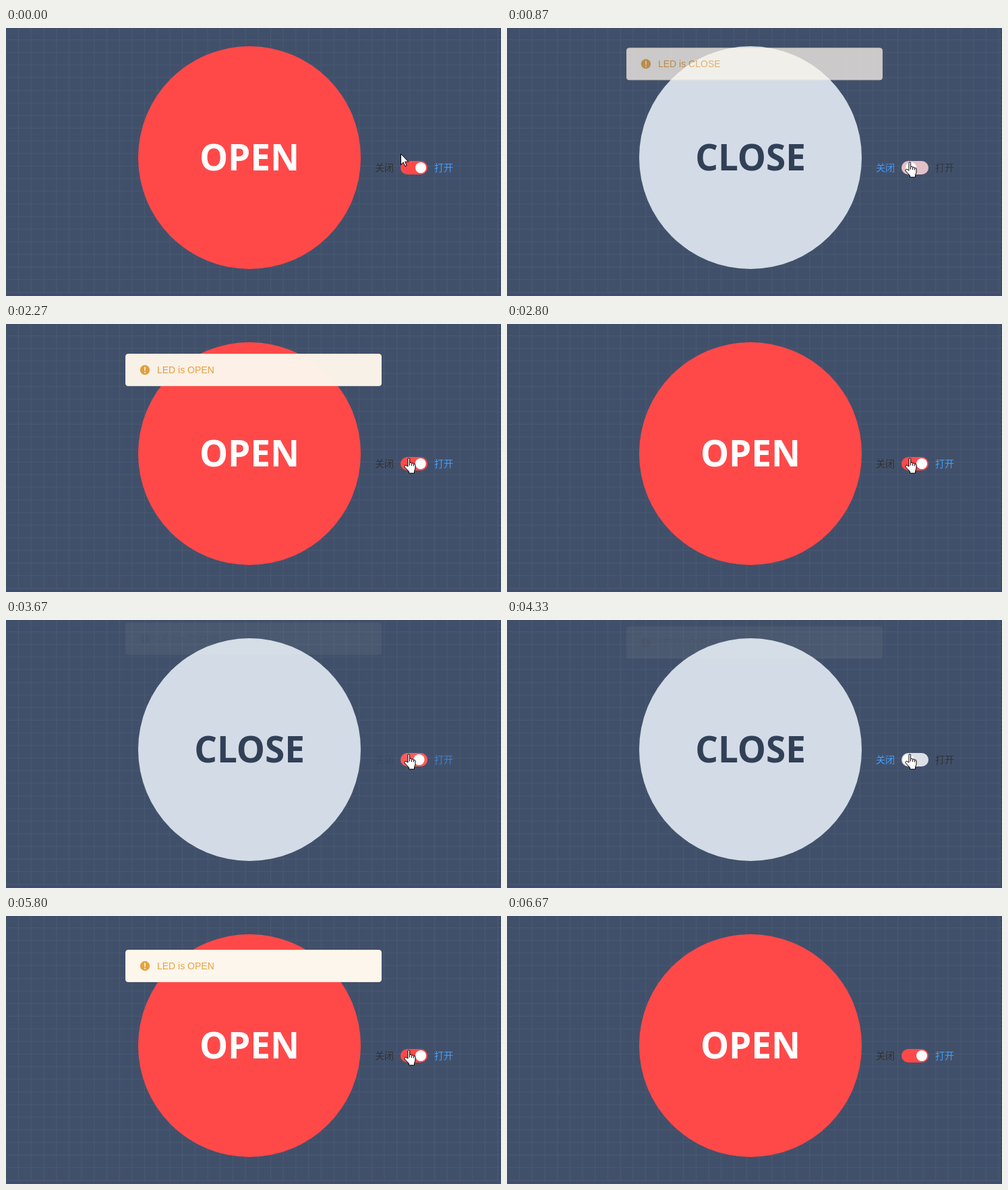
Animation, 734 px wide and 397 px high, one loop 7540 ms. Source, as an HTML page:

```html
<!DOCTYPE html>
<html lang="zh-CN">
<head>
<meta charset="utf-8">
<title>LED switch</title>
<style>
  html, body { margin: 0; width: 100%; height: 100%; overflow: hidden; background: #41506a; }
  svg { display: block; width: 100%; height: 100%; }
  .state { font: 700 53px "Open Sans", "Noto Sans", sans-serif; text-anchor: middle; }
  .label { font: 400 14px "Noto Sans CJK SC", "Noto Sans CJK", sans-serif; }
  .note { font: 14px "Liberation Sans", Arial, sans-serif; fill: #e6a23c; }
  .cursor path { fill: #fff; stroke: #000; stroke-linejoin: round; }
</style>
</head>
<body>
<svg viewBox="0 0 734 397">
  <defs>
    <pattern id="grid" x="18" y="17" width="18.7" height="18.7" patternUnits="userSpaceOnUse">
      <path d="M0 .5H18.7M.5 0V18.7" stroke="#4a5972" fill="none"/>
    </pattern>
  </defs>
  <rect width="734" height="397" fill="#41506a"/>
  <rect width="734" height="397" fill="url(#grid)"/>
  <rect y="393" width="734" height="4" fill="#414d72"/>
  <path d="M733.5 0V393" stroke="#364460" stroke-dasharray="3 3"/>

  <circle id="led" cx="361" cy="192" r="165"/>
  <text id="state" class="state" x="361" y="211"></text>

  <text id="offLabel" class="label" x="547" y="212.3">关闭</text>
  <rect id="track" x="585" y="197" width="40" height="20" rx="10"/>
  <circle id="knob" cy="207" r="8" fill="#fff"/>
  <text id="onLabel" class="label" x="635" y="212.3">打开</text>

  <g id="message">
    <rect x="177.5" y=".5" width="379" height="47" rx="3.5" fill="#fdf6ec" stroke="#faecd8"/>
    <circle cx="206" cy="24" r="7.2" fill="#e6a23c"/>
    <path d="M206 20V24.6" stroke="#fdf6ec" stroke-width="1.6" stroke-linecap="round"/>
    <circle cx="206" cy="27.6" r="1" fill="#fdf6ec"/>
    <text id="note" class="note" x="224" y="29"></text>
  </g>

  <g id="arrow" class="cursor">
    <path d="M.5.5V16.5L4.2 13L6.8 19L9.2 18L6.7 12.2H11.7Z"/>
  </g>
  <g id="hand" class="cursor">
    <path d="M6 13V2.2Q6 .6 7.3 .6T8.6 2.2V7.4Q11.4 6.6 11.6 8.2Q14 7.4 14.4 9.2Q17 8.6 17 11V15Q17 17 15.5 19.5V23H7.5V20.5L1.2 14Q.2 12.2 1.6 11.4T4 12Z"/>
    <path d="M8.6 7.4V11.5M11.6 8.2V12M14.4 9.2V12.5"/>
  </g>
</svg>
<script>
const LOOP = 7540;
const RATE = 0.015; // screen updates per millisecond
const RED = [255, 73, 73], GREY = [220, 223, 230];
const BLUE = [64, 158, 255], INK = [48, 49, 51];

// Each click flips the switch; its message leaves at the given time.
const clicks = [
  { at: 719, leave: 1215, on: false },
  { at: 2016, leave: 2507, on: true },
  { at: 3631, leave: 4115, on: false },
  { at: 5374, leave: 5866, on: true }
];
const MESSAGE_DELAY = 16;
// Spans of updates in which the screen stays as it was at the first one.
const holds = [[22, 31], [65, 81]];

const el = id => document.getElementById(id);
const [led, state, offLabel, onLabel, track, knob, message, note, arrow, hand] =
  ["led", "state", "offLabel", "onLabel", "track", "knob", "message", "note", "arrow", "hand"].map(el);

const set = (node, attrs) => {
  for (const name in attrs) node.setAttribute(name, attrs[name]);
};
const mix = (a, b, p) => `rgb(${a.map((v, i) => Math.round(v + (b[i] - v) * p)).join()})`;
const bezier = (a, b, u) => 3 * a * u * (1 - u) ** 2 + 3 * b * u * u * (1 - u) + u ** 3;

// CSS "ease": cubic-bezier(.25, .1, .25, 1)
function ease(elapsed, duration) {
  const x = elapsed / duration;
  if (x <= 0) return 0;
  if (x >= 1) return 1;
  let low = 0, high = 1;
  for (let i = 0; i < 24; i++) {
    const mid = (low + high) / 2;
    if (bezier(0.25, 0.25, mid) < x) low = mid; else high = mid;
  }
  return bezier(0.1, 1, low);
}

function drawSwitch(time, click) {
  const on = click ? click.on : true;
  const toward = duration => {
    const p = click ? ease(time - click.at, duration) : 1;
    return on ? p : 1 - p;
  };
  set(led, { fill: on ? "#ff4949" : "#d3dce6" });
  set(state, { fill: on ? "#fff" : "#324057" });
  state.textContent = on ? "OPEN" : "CLOSE";
  set(track, { fill: mix(GREY, RED, toward(300)) });
  set(knob, { cx: 595 + 20 * toward(300) });
  set(onLabel, { fill: mix(INK, BLUE, toward(200)) });
  set(offLabel, { fill: mix(BLUE, INK, toward(200)) });
}

function drawMessage(time, click) {
  if (!click) return set(message, { opacity: 0 });
  const enter = click.at + MESSAGE_DELAY;
  const shown = duration => ease(time - enter, duration) - ease(time - click.leave, duration);
  set(message, {
    opacity: shown(300),
    transform: `translate(0 ${2 + 48 * shown(400)})`
  });
  note.textContent = "LED is " + (click.on ? "OPEN" : "CLOSE");
}

function drawCursor(tick) {
  const place = (node, visible, x, y) =>
    set(node, { visibility: visible ? "visible" : "hidden", transform: `translate(${x} ${y})` });
  const leaving = tick === 99;
  place(arrow, tick === 0 || leaving, leaving ? 650 : 585, leaving ? 229 : 186);
  place(hand, tick > 0 && tick < 99, tick === 1 ? 589 : 590, tick === 1 ? 195 : 198);
}

function draw(now) {
  let tick = Math.floor((now % LOOP + 4) * RATE);
  for (const [from, to] of holds) if (tick > from && tick < to) tick = from;
  const time = tick / RATE;
  const click = clicks.filter(c => c.at <= time).pop();
  drawSwitch(time, click);
  drawMessage(time, click);
  drawCursor(tick);
}

const start = performance.now();
function loop() {
  draw(performance.now() - start);
  requestAnimationFrame(loop);
}
loop();
</script>
</body>
</html>
```
